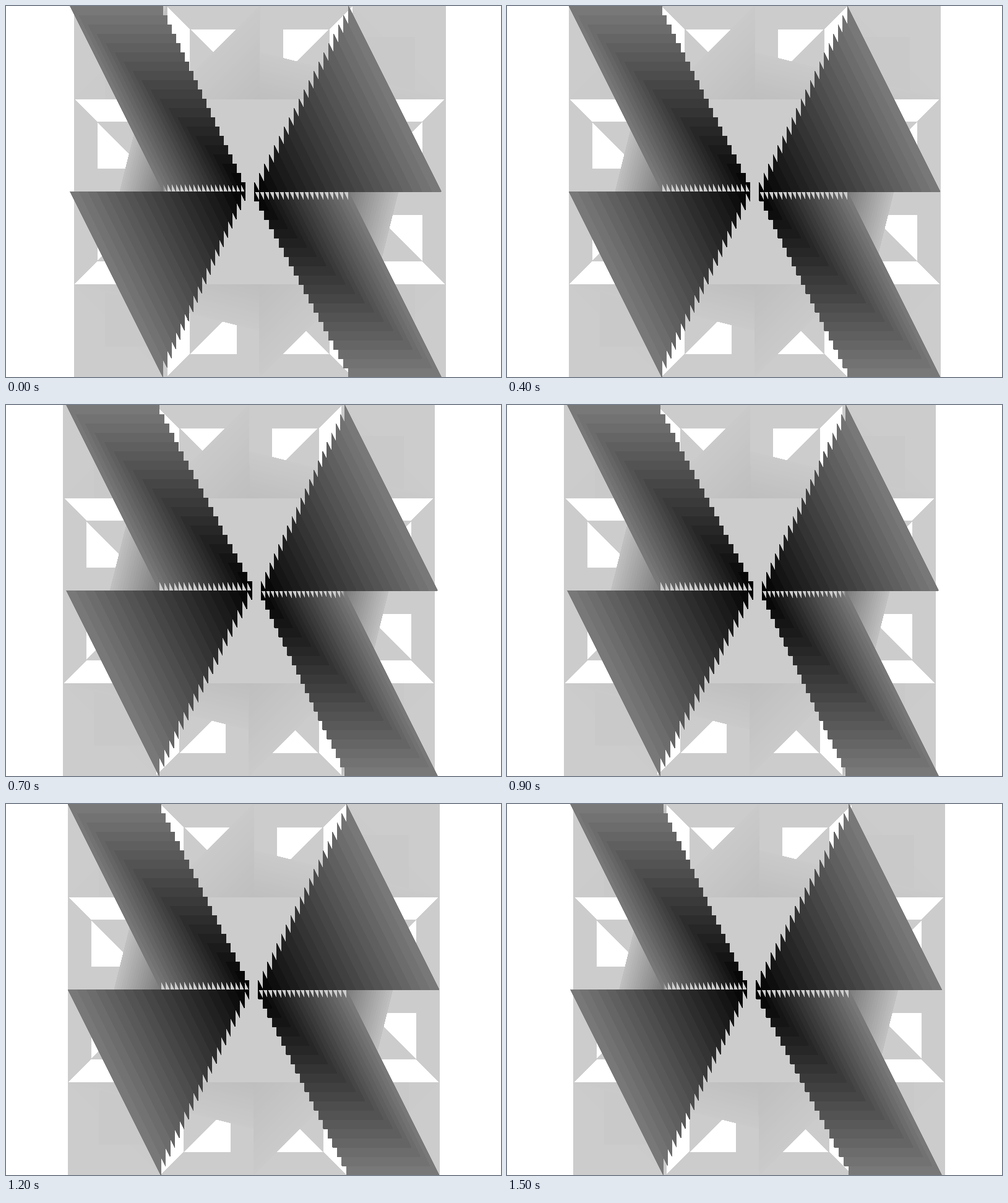
An HTML page that plays this animation: 800 px wide and 600 px high, repeating every 1600 ms.

```html
<!DOCTYPE html>
<html lang="en">
<head>
<meta charset="utf-8">
<title>Swaying quilt</title>
<style>
@property --sway { syntax: "<number>"; inherits: true; initial-value: 1; }

html, body { margin: 0; height: 100%; overflow: hidden; background: #fff; }

svg {
  display: block;
  width: 800px;
  height: 600px;
  shape-rendering: crispEdges;
  stroke-width: 1;
  stroke-linejoin: round;
  animation: sway 1600ms infinite;
}

/* Each layer follows the same sway by its own depth. */
svg > g { transform: translateX(calc(var(--sway) * var(--depth) * 1px)); }

@keyframes sway {
  0%, 100% { --sway: 1; animation-timing-function: steps(8); }
  50% { --sway: -1; animation-timing-function: steps(8); }
}
</style>
</head>
<body>
<svg id="stage" viewBox="-400 -300 800 600"></svg>
<script>
const NS = "http://www.w3.org/2000/svg";
const stage = document.getElementById("stage");
const grey = v => `rgb(${[v, v, v].map(Math.round)})`;
const mix = (a, b, t) => a + (b - a) * t;

// Quarter turns clockwise about the centre
function turn([x, y], n) {
  for (; n > 0; n--) [x, y] = [-y, x];
  return [x, y];
}

function layer(depth) {
  const g = document.createElementNS(NS, "g");
  g.style.setProperty("--depth", depth);
  return stage.appendChild(g);
}

function poly(g, points, turns, color, outlined = true) {
  const p = document.createElementNS(NS, "polygon");
  p.setAttribute("points", points.map(pt => turn(pt, turns).join()).join(" "));
  p.setAttribute("fill", color);
  if (outlined) p.setAttribute("stroke", color);
  g.appendChild(p);
}

const box = (x, y, w) => [[x, y], [x + w, y], [x + w, y + w], [x, y + w]];

function stack(count, depths, tones, turns, shapes) {
  for (let i = 0; i < count; i++) {
    const t = i / (count - 1);
    const g = layer(mix(...depths, t));
    const color = grey(mix(...tones, t));
    for (const n of turns)
      for (const shape of shapes(1 - i / count)) poly(g, shape, n, color);
  }
}

// Backdrop
const back = layer(10), light = grey(204);
poly(back, box(-150, -150, 300), 0, light);
for (let n = 0; n < 4; n++) {
  poly(back, box(-300, -300, 150), n, light);
  for (const m of [-1, 1]) {
    poly(back, [[m * 150, -300], [0, -300], [0, -150]], n, light);
    poly(back, box(m * 75 - 37.5, -262.5, 75), n, "#fff", false);
    poly(back, [[m * 112.5, -262.5], [m * 112.5, -187.5], [m * 37.5, -187.5]], n, light);
  }
}
for (let n = 0; n < 4; n++) {
  poly(back, [[150, -300], [300, -150], [150, -150]], n, grey(203));
  poly(back, box(150, -250, 100), n, grey(201));
}

// Folds around the middle square
const wide = r => [[0, -150 - 75 * r], [300 * r, -150], [0, -150]];
const even = r => [[0, -150 - 150 * r], [-150 * r, -150], [0, -150]];
stack(20, [10, 9], [202, 191], [0, 2], r => [even(r), wide(r)]);
stack(20, [9, 3.5], [191, 124], [1, 3], r => [wide(r)]);

// Dark blades
stack(20, [3.35, -6.2], [120, 2], [0, 2], r => {
  const s = 300 * r, h = s / 2;
  return [
    [[-s, -s], [-h, -s], [-h, 0]],
    [[-s, 0], [-h, 0], [-h, s]]
  ];
});
</script>
</body>
</html>
```
